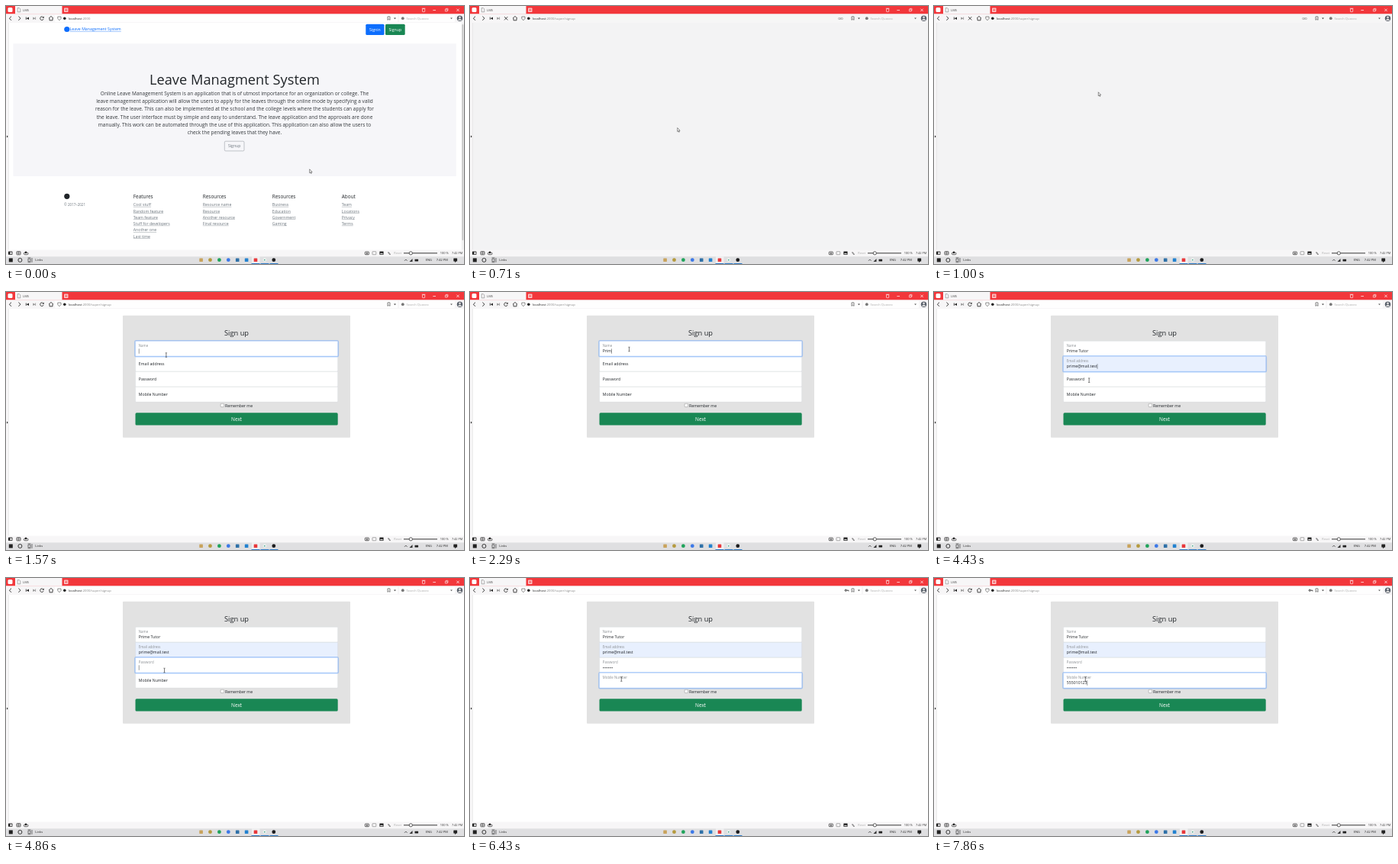
Animation, 600 px wide and 338 px high, one loop 8 s. Source, as an HTML page with a canvas:

```html
<!DOCTYPE html>
<html lang="en">
<head>
<meta charset="utf-8">
<title>LMS</title>
<style>
html, body { margin: 0; width: 100%; height: 100%; overflow: hidden; background: #fff; }
canvas { display: block; width: 600px; height: 338px; }
</style>
</head>
<body>
<canvas id="stage"></canvas>
<script>
const LOOP = 8000, STEP = 1000 / 7;
const canvas = document.getElementById('stage');
const c = canvas.getContext('2d');
const dpr = window.devicePixelRatio || 1;
canvas.width = 600 * dpr;
canvas.height = 338 * dpr;

const INK = '#212529', GRAY = '#6c757d', BLUE = '#0d6efd', GREEN = '#198754';
const NAME = 'Prime Tutor', EMAIL = 'prime@mail.test', PHONE = '555010123';

function rect(x, y, w, h, fill, r = 0, stroke, lw = 0.4) {
  c.beginPath();
  c.roundRect(x, y, w, h, r);
  if (fill) { c.fillStyle = fill; c.fill(); }
  if (stroke) { c.strokeStyle = stroke; c.lineWidth = lw; c.stroke(); }
}

function disc(x, y, r, fill, stroke, lw = 0.8) {
  rect(x - r, y - r, 2 * r, 2 * r, fill, r, stroke, lw);
}

// Points are a flat list: x, y, x, y ...
function path(pts, stroke, lw = 0.8, fill) {
  c.beginPath();
  for (let i = 0; i < pts.length; i += 2) c.lineTo(pts[i], pts[i + 1]);
  if (fill) { c.closePath(); c.fillStyle = fill; c.fill(); }
  if (stroke) { c.strokeStyle = stroke; c.lineWidth = lw; c.stroke(); }
}

// Set at ten times the size and scaled down, so that small glyphs keep exact spacing.
function text(str, x, y, size, color = INK, { align = 'left', weight = 400, underline = false } = {}) {
  c.save();
  c.translate(x, y);
  c.scale(0.1, 0.1);
  c.font = `${weight} ${size * 10}px "Open Sans", "Noto Sans", sans-serif`;
  c.textAlign = align;
  c.fillStyle = color;
  c.fillText(str, 0, 0);
  const width = c.measureText(str).width;
  if (underline) c.fillRect(0, 6, width, 3.5);
  c.restore();
  return width / 10;
}

const down = (x, y, color = '#333') => path([x - 1.4, y - 0.8, x + 1.4, y - 0.8, x, y + 1], null, 0, color);

function titleBar() {
  rect(0, 0, 600, 10.5, '#f2373b');
  rect(2.5, 2, 6, 6, '#fff', 1.5);
  rect(12, 0, 61.5, 10.5, '#f7f6f7');
  path([15.2, 2.6, 17.4, 2.6, 18.8, 4, 18.8, 7.8, 15.2, 7.8, 15.2, 2.6], '#666', 0.5);
  text('LMS', 22, 6.9, 4.1, '#444');
  rect(76, 2.5, 5.5, 5.5, '#fbc4c5', 0.8);
  path([78.75, 3.6, 78.75, 6.9], '#f2373b', 0.7);
  path([77.1, 5.25, 80.4, 5.25], '#f2373b', 0.7);
  rect(545.5, 3.6, 3.2, 4, null, 0.5, '#fff', 0.6);
  path([544.8, 3.2, 549.4, 3.2], '#fff', 0.6);
  path([559.3, 5.5, 563, 5.5], '#fff', 0.7);
  rect(575.4, 4.2, 2.7, 2.7, null, 0, '#fff', 0.6);
  path([576.4, 4.2, 576.4, 3.3, 579, 3.3, 579, 6, 578.1, 6], '#fff', 0.5);
  path([590.3, 3.6, 593.7, 7], '#fff', 0.7);
  path([593.7, 3.6, 590.3, 7], '#fff', 0.7);
}

function toolbar(k, loading) {
  rect(0, 10.5, 600, 11.5, '#f7f6f7');
  rect(64, 11.5, 449, 9.5, loading ? '#f6f6f6' : '#fefefe', 1);
  rect(515, 11.5, 73, 9.5, loading ? '#f6f6f6' : '#fefefe', 1);
  path([7, 13.6, 4.4, 16.2, 7, 18.8], '#222', 0.9);
  path([16.4, 13.6, 19, 16.2, 16.4, 18.8], '#222', 0.9);
  path([26.3, 14.5, 26.3, 17.9], '#222', 0.8);
  path([30, 14.4, 30, 18, 26.8, 16.2], null, 0, '#222');
  path([35.4, 14.4, 35.4, 18, 38.2, 16.2], null, 0, '#888');
  path([38.6, 14.5, 38.6, 17.9], '#888', 0.8);
  if (loading) {
    path([45, 14, 49.4, 18.4], '#222');
    path([49.4, 14, 45, 18.4], '#222');
    text('0/0', 482.5, 17.7, 4, '#444');
  } else {
    c.beginPath();
    c.arc(47, 16.2, 2.3, 0.3, 5.5);
    c.strokeStyle = '#222';
    c.lineWidth = 0.8;
    c.stroke();
    path([49.7, 13.4, 49.7, 15.8, 47.4, 15.8], null, 0, '#222');
  }
  path([56, 16.2, 59, 13.4, 62, 16.2], '#222');
  path([57, 15.8, 57, 18.8, 61, 18.8, 61, 15.8], '#222');
  path([67.8, 14, 72, 14, 72, 16.5, 69.9, 18.8, 67.8, 16.5, 67.8, 14], '#444', 0.6);
  disc(76.8, 16.2, 1.8, '#222');
  const host = text('localhost', 82, 17.8, 4.2, '#222');
  text(k < 5 ? ':2000' : ':2000/super/signup', 82 + host, 17.8, 4.2, '#888');
  if (k >= 37) {
    disc(492.3, 16.2, 1.1, null, '#222', 0.9);
    path([493.4, 16.2, 496, 16.2, 496, 17.4], '#222', 0.8);
  }
  path([500, 13.9, 503, 13.9, 503, 18.4, 501.5, 17, 500, 18.4, 500, 13.9], '#333', 0.6);
  down(509.5, 16.3);
  disc(519.8, 16.2, 1.9, '#777');
  text('Search Quovex', 524.5, 17.8, 4.2, '#aaa');
  down(583.5, 16.3, '#555');
  disc(594.5, 16.2, 3.7, '#59606b');
  disc(594.5, 15, 1.4, '#d9d9d9');
  path([592, 18.9, 593, 17, 596, 17, 597, 18.9], null, 0, '#d9d9d9');
}

function statusBar() {
  rect(0, 319.5, 600, 8.8, '#f7f6f7');
  rect(3, 321.6, 5.4, 4.2, '#222', 0.6);
  rect(5.4, 322.4, 2.2, 2.6, '#f7f6f7');
  rect(14, 321.6, 5, 4.2, null, 0.4, '#222', 0.7);
  path([16.5, 321.6, 16.5, 325.8], '#222', 0.5);
  path([14, 323.7, 19, 323.7], '#222', 0.5);
  rect(23.4, 323, 5.6, 2.7, null, 1.3, '#222', 0.7);
  disc(26, 322.9, 1.3, '#222');
  rect(470.4, 322, 5, 3.7, null, 0.6, '#222', 0.7);
  disc(472.9, 323.9, 0.9, '#222');
  rect(480, 321.7, 4.8, 4, null, 0.4, '#777', 0.6);
  rect(489.4, 321.6, 5.2, 4.2, '#222', 0.5);
  path([490, 325, 491.4, 323.4, 492.4, 324.4, 493.2, 323.8, 494, 325], null, 0, '#fff');
  path([500, 323, 502, 323, 502, 325.2, 504, 325.2], '#222', 0.6);
  text('Reset', 508.3, 325.2, 3.8, '#aaa');
  path([521, 323.8, 565, 323.8], '#222', 0.9);
  disc(530.3, 323.8, 2.1, '#fff', '#222', 0.7);
  text('100 %', 568.7, 325.2, 4, '#333');
  text('7:42 PM', 584, 325.2, 3.8, '#333');
}

function taskbar() {
  rect(0, 328.2, 600, 9.8, '#dfdfe1');
  rect(3.8, 330.4, 5, 5, '#222');
  disc(18.4, 332.9, 2.5, null, '#222', 0.9);
  rect(29, 331, 3, 3.8, null, 0, '#222', 0.6);
  path([28.5, 329.8, 32.5, 329.8], '#222', 0.5);
  path([28.5, 335.8, 32.5, 335.8], '#222', 0.5);
  path([34, 330, 34, 335.8], '#222', 0.6);
  text('Links', 38.3, 334.4, 4.1, '#222');
  rect(322, 328.2, 10.5, 9, '#f0f0f1');
  ['#c9a35c', '#b59a3e', '#1fa35a', '#3c78e8', '#2f71a8', '#2382cf', '#e8383b', '#e9f2ee', '#1d1d1f']
    .forEach((color, i) => {
      const x = 255.6 + i * 11.9;
      if (i == 0 || i > 3 && i < 7) rect(x - 2.3, 330.4, 4.6, 4.6, color, 0.6);
      else disc(x, 332.7, 2.4, color);
    });
  disc(338.8, 332.7, 0.8, '#288a75');
  [321.5, 333.5, 345.5].forEach(x => rect(x, 337.1, 11, 0.9, '#1b70c4'));
  path([522, 333.8, 523.8, 332, 525.6, 333.8], '#222', 0.7);
  path([528.5, 335, 532.5, 335, 532.5, 331], null, 0, '#333');
  rect(535.5, 331.8, 4.6, 2.6, '#222', 0.3);
  text('ENG', 549.8, 334.4, 4, '#222');
  text('7:42 PM', 563.8, 334.4, 4, '#222');
  rect(586.3, 330.6, 4.8, 4, '#222', 0.4);
  path([588, 334, 588, 336.2, 590, 334], null, 0, '#222');
}

const INTRO = [
  'Online Leave Management System is an application that is of utmost importance for an organization or college. The',
  'leave management application will allow the users to apply for the leaves through the online mode by specifying a valid',
  'reason for the leave. This can also be implemented at the school and the college levels where the students can apply for',
  'the leave. The user interface must by simple and easy to understand. The leave application and the approvals are done',
  'manually. This work can be automated through the use of this application. This application can also allow the users to',
  'check the pending leaves that they have.'
];
const COLUMNS = [
  ['Features', 'Cool stuff', 'Random feature', 'Team feature', 'Stuff for developers', 'Another one', 'Last time'],
  ['Resources', 'Resource name', 'Resource', 'Another resource', 'Final resource'],
  ['Resources', 'Business', 'Education', 'Government', 'Gaming'],
  ['About', 'Team', 'Locations', 'Privacy', 'Terms']
];

function homePage(k) {
  const center = { align: 'center' }, underline = { underline: true };
  disc(79.8, 30.5, 3.6, BLUE);
  text('Leave Management System', 83.6, 32.4, 5.25, BLUE, underline);
  rect(471.3, 23.7, 24.2, 14.3, BLUE, 1.5);
  text('Signin', 483.4, 32.6, 5.2, '#fff', center);
  rect(497, 23.7, 25.7, 14.3, GREEN, 1.5);
  text('Signup', 509.8, 32.6, 5.2, '#fff', center);

  rect(9.5, 49.3, 580.3, 173.7, '#f6f6f9');
  text('Leave Managment System', 299.5, 102.6, 18.25, INK, center);
  INTRO.forEach((line, i) => text(line, 299.5, 116.6 + i * 10.36, 6.55, '#33373b', center));
  const hover = k == 4;
  rect(286.3, 177.2, 25.7, 12.7, hover && GRAY, 1.5, GRAY);
  text('Signup', 299.2, 185.3, 5.2, hover ? '#fff' : GRAY, center);

  disc(79.8, 249.3, 3.6, INK);
  text('© 2017–2021', 76, 262, 4.55, GRAY);
  COLUMNS.forEach(([head, ...links], i) => {
    const x = 166.8 + i * 91;
    text(head, x, 251.8, 6.4, INK, { weight: 500 });
    links.forEach((link, j) => text(link, x, 262.3 + j * 8.28, 5.2, GRAY, underline));
  });
  rect(596.7, 22, 3.3, 297.5, '#f1f1f1');
  rect(597.4, 24, 1.9, 283, '#c4c4c4', 0.9);
}

function field(label, i, value, focused, k) {
  const y = 64.3 + i * 20;
  if (focused) rect(168.8, y - 0.7, 266.6, 21.2, null, 1.6, 'rgba(13,110,253,.27)', 1.4);
  const filled = i == 1 && k >= 30;
  rect(169.5, y, 265.2, 19.8, filled ? '#e8f0fe' : '#fff', 1, focused ? '#86b7fe' : '#ced4da');
  if (!value && !focused) return text(label, 173.8, y + 12, 5.2);
  text(label, 173.8, y + 7.9, 4.4, '#8b8f93');
  const size = i == 2 ? 6 : 5.2;
  const end = 173.8 + text(value, 173.8, y + (i == 2 ? 15.4 : 15.1), size);
  const typing = i == 3 ? k > 46 : value;
  if (focused && (typing || k % 8 < 4)) rect(end + 0.1, y + 10, 0.45, 6.4, INK);
}

function formPage(k) {
  rect(153, 30.8, 298, 160, '#e2e2e2', 1);
  text('Sign up', 302, 57, 9.3, INK, { align: 'center' });
  const typed = (str, n) => str.slice(0, Math.max(0, n));
  const values = [
    typed(NAME, k - 12),
    k < 30 ? typed(EMAIL, Math.min(2, k - 23)) : EMAIL,
    typed('••••••', k - 34),
    typed(PHONE, k < 53 ? k - 46 : k < 55 ? 8 : 9)
  ];
  const focus = [11, 24, 33, 42].filter(start => k >= start).length - 1;
  const labels = ['Name', 'Email address', 'Password', 'Mobile Number'];
  const order = [0, 1, 2, 3].filter(i => i != focus);
  if (focus >= 0) order.push(focus);
  order.forEach(i => field(labels[i], i, values[i], i == focus, k));

  rect(281.2, 146.3, 4.3, 4.3, '#fff', 0.6, '#777');
  text('Remember me', 287, 150.6, 5.2);
  rect(169.5, 158.3, 265.2, 16.2, GREEN, 1.6);
  text('Next', 302.1, 168.8, 6.5, '#fff', { align: 'center' });

  if (k >= 25 && k < 30) {
    rect(168.4, 105.4, 67.6, 19, 'rgba(0,0,0,.1)', 1);
    rect(169, 105.5, 66, 18, '#fff', 0.8);
    if (k >= 28) rect(169, 109, 66, 10.5, '#ededed');
    text(EMAIL, 172.4, 115.6, 4.5, '#111');
  }
}

const ROUTE = [[0, 397.7, 213.8], [1, 385, 210], [4, 300, 183], [7, 215.3, 112.8], [12, 208.5, 75], [25, 208.5, 75],
  [28, 201, 113], [30, 201, 113], [33, 207.5, 121], [41, 207.5, 121], [45, 198.3, 132.5], [56, 198.3, 132.5]];

function pointer(k) {
  const i = ROUTE.findIndex(stop => stop[0] > k);
  const [k0, x0, y0] = ROUTE[i - 1], [k1, x1, y1] = ROUTE[i];
  const p = (k - k0) / (k1 - k0);
  const x = x0 + (x1 - x0) * p, y = y0 + (y1 - y0) * p;
  if (k >= 8 && !(k >= 27 && k < 31)) {
    path([x, y - 2.7, x, y + 2.7], '#222', 0.6);
    path([x - 1.2, y - 2.8, x + 1.2, y - 2.8], '#222', 0.5);
    path([x - 1.2, y + 2.8, x + 1.2, y + 2.8], '#222', 0.5);
  } else {
    path([x, y, x, y + 5, x + 1.1, y + 4, x + 1.9, y + 5.7, x + 2.6, y + 5.4, x + 1.9, y + 3.7, x + 3.4, y + 3.6, x, y],
      '#222', 0.5, '#fff');
  }
}

function draw(k) {
  const loading = k >= 5 && k < 8;
  c.setTransform(dpr, 0, 0, dpr, 0, 0);
  rect(0, 0, 600, 338, loading ? '#f3f3f4' : '#fff');
  if (k < 5) homePage(k);
  else if (!loading) formPage(k);
  rect(0, 22, 3.5, 297.5, '#f7f6f7');
  rect(3.4, 22, 0.4, 297.5, '#d4d4d4');
  path([1, 169.5, 1, 172.5, 2.7, 171], null, 0, '#222');
  titleBar();
  toolbar(k, loading);
  statusBar();
  taskbar();
  pointer(k);
}

let shown = -1;
function tick() {
  const k = Math.floor((performance.now() % LOOP + 5) / STEP) % 56;
  if (k != shown) draw(shown = k);
  requestAnimationFrame(tick);
}
tick();
</script>
</body>
</html>
```
